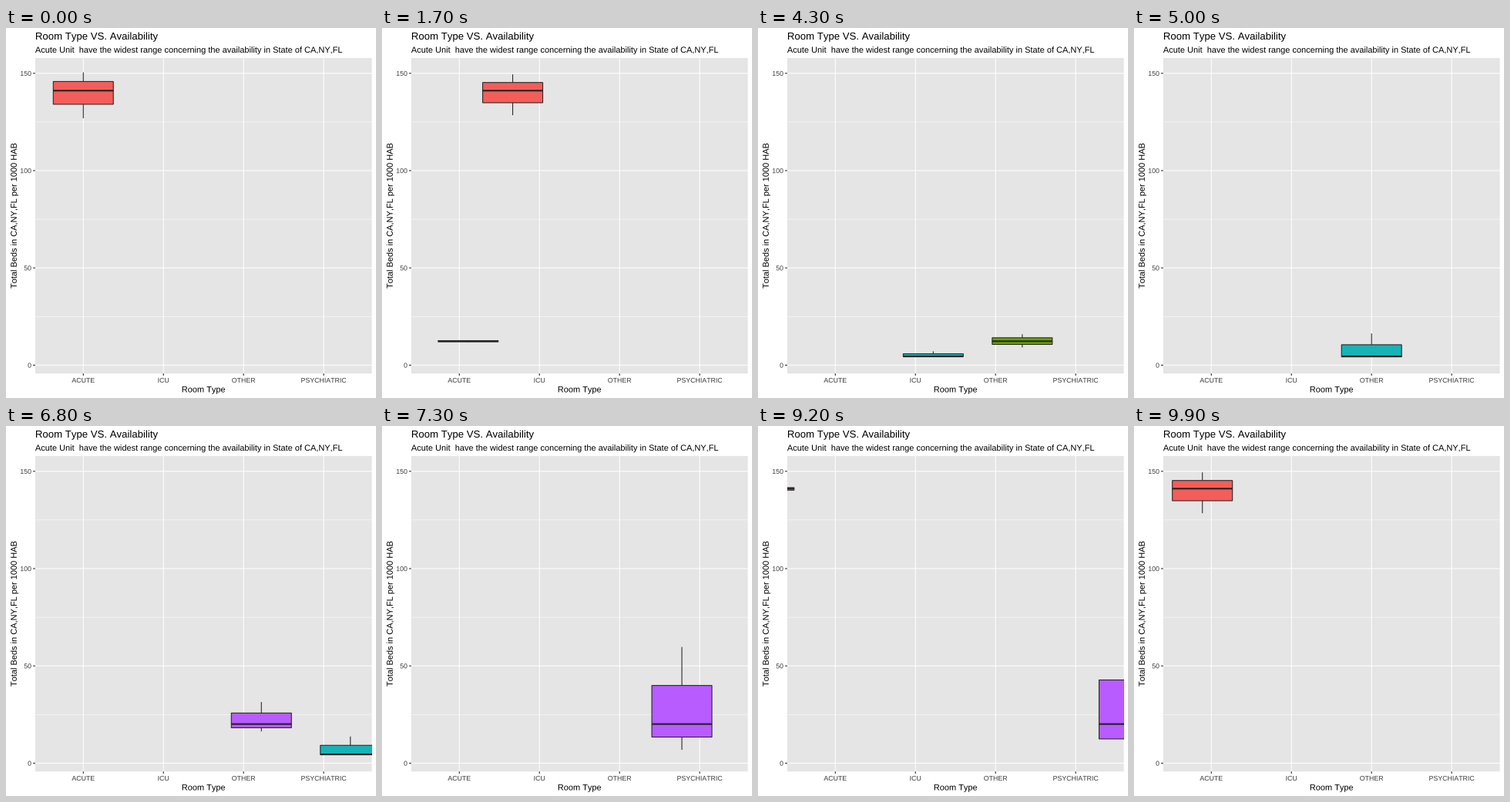
Animation of 480 by 480 pixels, one loop 10000 ms. Source, as a matplotlib script:

```python
import matplotlib.pyplot as plt
from matplotlib.animation import FuncAnimation
from matplotlib.patches import PathPatch, Rectangle
from matplotlib.textpath import TextPath
from matplotlib.transforms import Affine2D

SIZE, DPI = 480, 80
PX = 72 / DPI                      # points per pixel
LEFT, RIGHT, TOP, BOTTOM = 37.9, 474.5, 38.9, 448.2
UNIT = (RIGHT - LEFT) / 4.2        # width of one category
LINE = 1.07
DARK, GREY, PANEL = "#242424", "#3c3c3c", "#e5e5e5"

HOLD, STEPS = 17, 9                # resting frames, steps per transition
CYCLE = HOLD + STEPS - 1
ENTER_SHIFT, EXIT_SHIFT = -1, 6    # in categories

# name, fill, (low, lower hinge, median, upper hinge, high)
ROOMS = [
    ("ACUTE", "#f35e5a", (126.9, 134.1, 141.1, 145.8, 150.5)),
    ("ICU", "#6ba300", (8.2, 10.2, 12.3, 14.6, 16.9)),
    ("OTHER", "#17b3b7", (4.3, 4.3, 4.5, 10.5, 16.3)),
    ("PSYCHIATRIC", "#b85cff", (3.1, 11.5, 20.1, 45.6, 71.0)),
]

# A high kerning factor switches kerning off.
plt.rcParams.update({"font.family": "Liberation Sans", "text.kerning_factor": 6})


def x_pos(category):
    return LEFT + UNIT * (category - 0.4)


def y_pos(value):
    return 437.4 - 2.524 * value


fig = plt.figure(figsize=(SIZE / DPI, SIZE / DPI), dpi=DPI, facecolor="white")
ax = fig.add_axes([0, 0, 1, 1])
ax.set_xlim(0, SIZE)
ax.set_ylim(SIZE, 0)
ax.axis("off")

panel = Rectangle((LEFT, TOP), RIGHT - LEFT, BOTTOM - TOP, fc=PANEL, ec="none",
                  zorder=0, snap=False)
ax.add_patch(panel)


def line(xs, ys, color, width=LINE, zorder=1):
    (item,) = ax.plot(xs, ys, color=color, lw=width * PX, zorder=zorder,
                      solid_capstyle="butt", snap=False)
    return item


def advance(text, size):
    """Width of the text with its side bearings."""
    ends = [TextPath((0, 0), s, size=size).get_extents().x1 for s in (text + "|", "|")]
    return ends[0] - ends[1]


def label(x, y, text, size, color="black", align=0.5, angle=0):
    """Text as outlines, so that it keeps its place between pixels."""
    path = TextPath((-align * advance(text, size), 0), text, size=size)
    place = Affine2D().scale(1, -1).rotate_deg(-angle).translate(x, y)
    ax.add_patch(PathPatch(place.transform_path(path), fc=color, ec="none", lw=0,
                           zorder=2, snap=False))


def draw_axes():
    for value in (25, 75, 125):
        line([LEFT, RIGHT], [y_pos(value)] * 2, "white", LINE / 2)
    for value in (0, 50, 100, 150):
        y = y_pos(value)
        line([LEFT, RIGHT], [y, y], "white")
        line([LEFT - 2.75, LEFT], [y, y], DARK)
        label(33, y + 3.2, str(value), 8.8, GREY, align=1)
    for i, (name, _, _) in enumerate(ROOMS, 1):
        x = x_pos(i)
        line([x, x], [TOP, BOTTOM], "white")
        line([x, x], [BOTTOM, BOTTOM + 2.75], DARK)
        label(x, 460, name, 8.8, GREY)

    label(LEFT, 15, "Room Type VS. Availability", 13.2, align=0)
    label(LEFT, 32, "Acute Unit  have the widest range concerning the "
          "availability in State of CA,NY,FL", 11, align=0)
    label((LEFT + RIGHT) / 2, 472.5, "Room Type", 11)
    label(13.8, (TOP + BOTTOM) / 2, "Total Beds in CA,NY,FL per 1000 HAB", 11, angle=90)


class Box:
    def __init__(self, index):
        _, fill, self.stats = ROOMS[index]
        self.home = index + 1
        z = 3 + index
        self.whiskers = [line([], [], DARK, zorder=z) for _ in range(2)]
        self.body = Rectangle((0, 0), 0.75 * UNIT, 0, fc=fill, ec=DARK, lw=LINE * PX,
                              zorder=z + 0.1, snap=False, joinstyle="miter")
        ax.add_patch(self.body)
        self.median = line([], [], DARK, 2 * LINE, z + 0.2)
        self.parts = [*self.whiskers, self.body, self.median]
        for part in self.parts:
            part.set_clip_path(panel)

    def hide(self):
        for part in self.parts:
            part.set_visible(False)

    def place(self, shift, grow):
        """Move sideways by categories and scale heights around the median."""
        mid = self.stats[2]
        low, q1, mid, q3, high = (y_pos(mid + (v - mid) * grow) for v in self.stats)
        x = x_pos(self.home + shift)
        half = 0.375 * UNIT
        self.whiskers[0].set_data([x, x], [q3, high])
        self.whiskers[1].set_data([x, x], [q1, low])
        self.body.set_xy((x - half, q3))
        self.body.set_height(q1 - q3)
        self.median.set_data([x - half, x + half], [mid, mid])
        for part in self.parts:
            part.set_visible(True)


draw_axes()
boxes = [Box(i) for i in range(len(ROOMS))]


def update(frame):
    state, tick = divmod(frame, CYCLE)
    t = max(0, tick - HOLD + 1) / STEPS
    for box in boxes:
        box.hide()
    boxes[state].place(EXIT_SHIFT * t, 1 - t)
    if t > 0:
        boxes[(state + 1) % len(boxes)].place(ENTER_SHIFT * (1 - t), t)
    return [part for box in boxes for part in box.parts]


anim = FuncAnimation(fig, update, frames=CYCLE * len(ROOMS), interval=100,
                     repeat=True, repeat_delay=0, blit=False)
plt.show()
```
